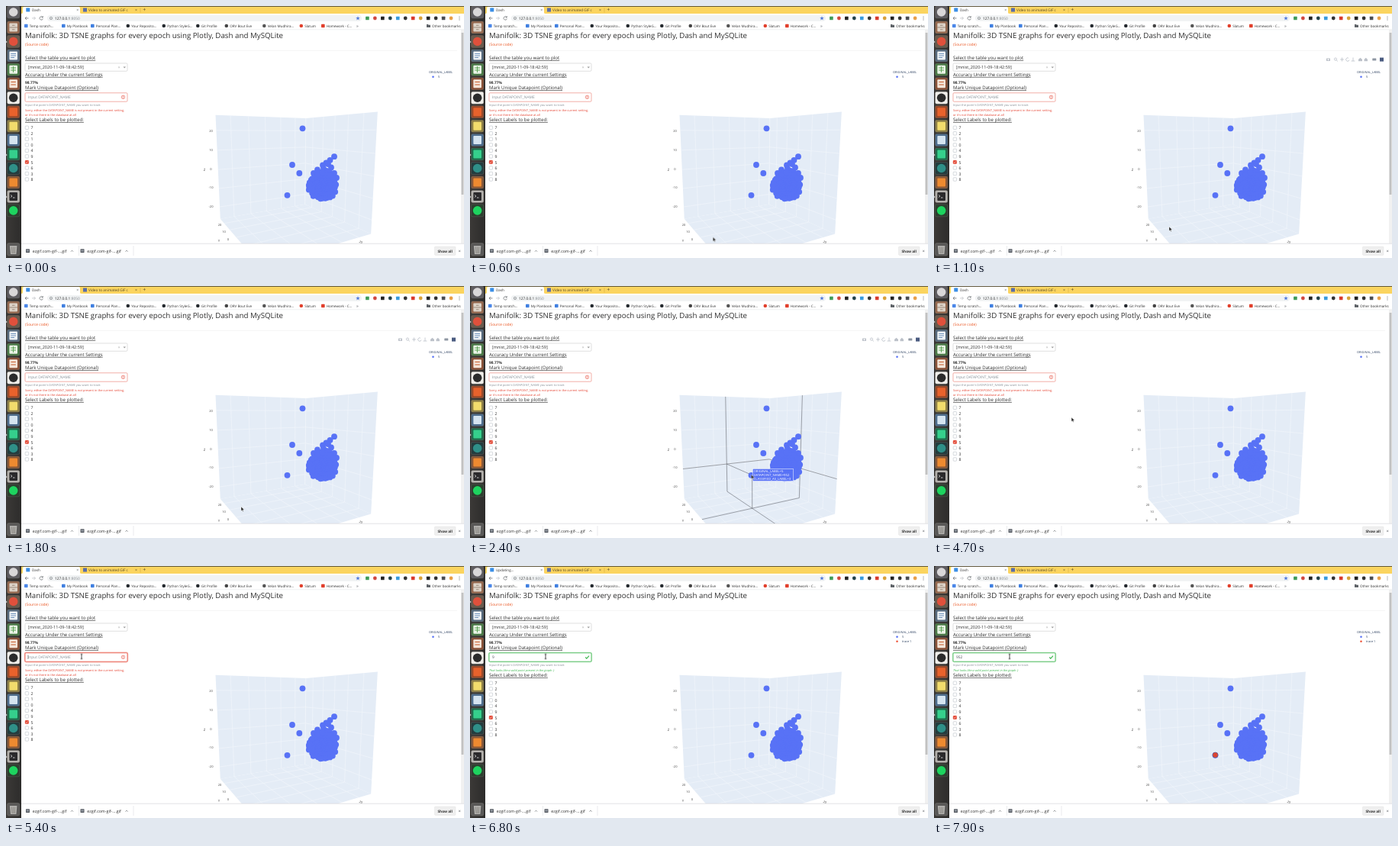
These frames come from a looping animation (600 by 330 pixels, 8 s). An HTML page:

```html
<!DOCTYPE html>
<html lang="en">
<head>
<meta charset="utf-8">
<title>Manifolk</title>
<style>
html, body { margin: 0; width: 100%; height: 100%; overflow: hidden; background: #fff; }
svg { display: block; width: 600px; height: 330px; }
text { font-family: "Open Sans", "Noto Sans", sans-serif; text-rendering: geometricPrecision; white-space: pre; }
.u { text-decoration: underline; }
.b { font-weight: 700; }
.i { font-style: italic; }
.m { text-anchor: middle; }

.a { animation: 8s step-end infinite; }
.bar { animation-name: bar; }
.hover { animation-name: hover; }
.before { animation-name: before; }
.after { animation-name: after; }
.focus { animation-name: focus; }
.busy { animation-name: busy; }
.idle { animation-name: idle; }
.n1 { animation-name: n1; }
.n2 { animation-name: n2; }
.n3 { animation-name: n3; }
.mark { animation-name: mark; }
.caret { animation-name: caret; }
.arrow { animation-name: arrow; }
.beam { animation-name: beam; }
.lift { animation-name: lift; }
.mouse { animation: mouse 8s linear infinite; }

@keyframes bar { 0% { opacity: 0 } 10% { opacity: 1 } 57.5%, 100% { opacity: 0 } }
@keyframes hover { 0% { opacity: 0 } 28.75% { opacity: 1 } 52%, 100% { opacity: 0 } }
@keyframes before { 0% { opacity: 1 } 83.75%, 100% { opacity: 0 } }
@keyframes after { 0% { opacity: 0 } 83.75%, 100% { opacity: 1 } }
@keyframes focus { 0% { opacity: 0 } 67% { opacity: 1 } 83.75%, 100% { opacity: 0 } }
@keyframes busy { 0% { opacity: 0 } 83.75% { opacity: 1 } 95%, 100% { opacity: 0 } }
@keyframes idle { 0% { opacity: 1 } 83.75% { opacity: 0 } 95%, 100% { opacity: 1 } }
@keyframes n1 { 0% { opacity: 0 } 83.75% { opacity: 1 } 88.75%, 100% { opacity: 0 } }
@keyframes n2 { 0% { opacity: 0 } 88.75% { opacity: 1 } 92.5%, 100% { opacity: 0 } }
@keyframes n3 { 0% { opacity: 0 } 92.5%, 100% { opacity: 1 } }
@keyframes mark { 0% { opacity: 0 } 95%, 100% { opacity: 1 } }
@keyframes caret { 0% { opacity: 0 } 67% { opacity: 1 } 73.5% { opacity: 0 } 79.5% { opacity: 1 } 83.75%, 100% { opacity: 0 } }
@keyframes arrow { 0% { opacity: 0 } 1.5% { opacity: 1 } 63.5%, 100% { opacity: 0 } }
@keyframes beam { 0% { opacity: 0 } 63.5%, 100% { opacity: 1 } }
@keyframes lift { 0% { transform: none } 83.75%, 100% { transform: translateY(-6px) } }
@keyframes mouse {
  0%, 1.5% { transform: translate(336px, 326px) }
  11%, 23% { transform: translate(308px, 289px) }
  28.5%, 51% { transform: translate(368.5px, 247px) }
  60% { transform: translate(150px, 160px) }
  65%, 100% { transform: translate(99px, 118.5px) }
}
</style>
</head>
<body>
<svg id="stage" viewBox="0 0 600 330" xmlns="http://www.w3.org/2000/svg">
  <defs>
    <clipPath id="page"><rect x="20" y="31" width="576" height="280"/></clipPath>
    <linearGradient id="dockFill" x1="0" x2="1" y1="0" y2="0">
      <stop offset="0" stop-color="#3b3937"/><stop offset="1" stop-color="#2d2c2b"/>
    </linearGradient>
    <linearGradient id="fade" x1="0" x2="1" y1="0" y2="0">
      <stop offset="0" stop-color="#fbd45f" stop-opacity="0"/><stop offset="1" stop-color="#fbd45f"/>
    </linearGradient>
  </defs>
  <rect width="600" height="330" fill="#fff"/>
  <g id="plot" clip-path="url(#page)"></g>
  <g id="form"></g>
  <g id="chrome"></g>
  <g id="dock"></g>
  <g class="mouse">
    <path class="a arrow" d="M0 0V5.6L1.3 4.4 2.2 6.3 3.1 5.9 2.3 4.1H4Z" fill="#222" stroke="#fff" stroke-width=".4"/>
    <path class="a beam" d="M-1.3-3H1.3M-1.3 3H1.3M0-3V3" fill="none" stroke="#222" stroke-width=".8"/>
  </g>
</svg>
<script>
const NS = 'http://www.w3.org/2000/svg';
let layer;
const use = id => layer = document.getElementById(id);
function add(tag, attrs, parent = layer) {
  const el = document.createElementNS(NS, tag);
  for (const k in attrs) el.setAttribute(k, attrs[k]);
  return parent.appendChild(el);
}
const rect = (x, y, width, height, fill, more) => add('rect', { x, y, width, height, fill, ...more });
const dot = (cx, cy, r, fill, more) => add('circle', { cx, cy, r, fill, ...more });
const line = (d, stroke, w = .7, more) =>
  add('path', { d, stroke, fill: 'none', 'stroke-width': w, ...more });
const text = (x, y, size, str, fill = '#2e2e2e', cls = '', more) => {
  add('text', { x, y, 'font-size': size, fill, class: cls, ...more }).textContent = str;
};
// Runs draw() inside a group that is shown by a keyframe class
function group(cls, draw) {
  const outer = layer;
  layer = add('g', { class: 'a ' + cls });
  draw();
  layer = outer;
}

const BLUE = '#5872f6', RED = '#e4402f', GREEN = '#38b44a', ORANGE = '#e95420', INK = '#2e2e2e';

// 3D box seen in perspective: a runs along the left wall, b along the right wall
const tilt = 9 * Math.PI / 180, sn = Math.sin(tilt), cs = Math.cos(tilt);
function project([a, b, z]) {
  const p = -.683 + .866 * a + .5 * b, q = .183 + .5 * a - .866 * b;
  const k = 322 / (2.165 + q * cs - z * sn);
  return (371.5 + p * k).toFixed(2) + ' ' + (217 - (q * sn + z * cs) * k).toFixed(2);
}
const path = pts => 'M' + pts.map(project).join('L');

function drawPlot() {
  use('plot');
  const walls = [
    [[0, 0, .5], [1, 0, .5], [1, 0, -.5], [0, 0, -.5]],
    [[1, 0, .5], [1, 1, .5], [1, 1, -.5], [1, 0, -.5]],
    [[0, 0, -.5], [1, 0, -.5], [1, 1, -.5], [0, 1, -.5]]
  ];
  walls.forEach(w => add('path', { d: path(w) + 'Z', fill: '#e4ecf6' }));

  let grid = '';
  for (let i = -2; i <= 2; i++) {
    const s = .5 + i * .18, z = i * .1845 - .008;
    grid += path([[0, 0, z], [1, 0, z], [1, 1, z]]);
    grid += path([[s, 0, .5], [s, 0, -.5], [s, 1, -.5]]);
    grid += path([[1, s, .5], [1, s, -.5], [0, s, -.5]]);
  }
  line(grid + path([[1, 0, .5], [1, 0, -.5]]), '#f1f5fb', .7);

  ['20', '10', '0', '-10', '-20'].forEach((t, i) =>
    text(268.5, 165 + i * 24.8, 4, t, '#444', 'm'));
  text(260, 216.3, 4.4, 'Z', '#444', 'm');
  ['20', '10', '0'].forEach((t, i) => text(280 + i * 5.5, 287.5 + i * 9.5, 4, t, '#444', 'm'));
  text(279, 309, 4.4, 'Y', '#444', 'm');
  text(465, 310.5, 4, '20', '#444', 'm', { transform: 'rotate(25 465 309)' });

  group('hover', () => {
    const a = .46, b = .545, z = -.197;
    const d = [
      [[0, 0, z], [1, 0, z], [1, 1, z]],
      [[a, 0, .5], [a, 0, -.5], [a, 1, -.5]],
      [[1, b, .5], [1, b, -.5], [0, b, -.5]],
      [[a, 0, z], [a, b, z], [1, b, z]],
      [[a, b, z], [a, b, -.5]]
    ].map(path).join('');
    line(d, '#5a5d63', .55);
  });

  const loose = [[388.5, 160.3], [375, 208], [384.3, 219], [368.5, 247.8], [430, 197.2], [424.5, 201.8],
    [419.5, 205.5], [415, 208.5], [416, 213], [422, 207], [408, 214.5], [426, 211.5], [403, 219],
    [412, 218], [420, 216], [430, 219], [433, 225], [424, 218]];
  loose.forEach(([x, y]) => dot(x, y, 3.9, BLUE));
  for (let i = 0; i < 130; i++) {
    const r = Math.sqrt(i / 130), t = i * 2.4, jog = Math.sin(i * 7.3);
    dot(414.8 + (18.8 * r + jog) * Math.cos(t), 235.8 + (17.6 * r + jog) * Math.sin(t), 3.7, BLUE);
  }
  group('mark', () => {
    dot(368.5, 247.5, 3.5, '#e8432f', { stroke: '#59618f', 'stroke-width': .7 });
    line('M366.5 245.5L370.5 249.5M370.5 245.5L366.5 249.5', '#a8483f', .5);
  });

  group('hover', () => {
    rect(370.3, 239.3, 53.4, 16.2, BLUE, { stroke: '#fff', 'stroke-width': .5 });
    ['ORIGINAL_LABEL=5', 'DATAPOINT_NAME=952', 'CLASSIFIED_AS_LABEL=3'].forEach((t, i) =>
      text(371.5, 244 + i * 5.1, 4.3, t, '#fff'));
  });

  text(554, 88.4, 3.95, 'ORIGINAL_LABEL', '#2a3f5f');
  dot(559.5, 92.8, 1.3, BLUE);
  text(566, 94.3, 3.9, '5', '#2a3f5f');
  group('after', () => {
    dot(559.5, 98.8, 1.3, '#ef553b');
    text(566, 100.3, 3.9, 'trace 1', '#2a3f5f');
  });
  group('bar', drawModebar);
}

function drawModebar() {
  const g = '#bcc1c9';
  rect(514, 68.4, 5, 3.6, g, { rx: .6 });
  dot(516.5, 70.2, 1, '#fff');
  dot(526, 69.6, 1.6, 'none', { stroke: g, 'stroke-width': .8 });
  line('M527.2 70.8L528.8 72.4', g, .9);
  line('M532 70H537M534.5 67.5V72.5', g, .8);
  line('M543 68.2A2.2 2.2 0 1 0 544 70.6', g, .8);
  line('M546.6 72H551.4M549 67.5V72', g, .8);
  add('path', { d: 'M556 70L558.5 67.8 561 70V72.2H556Z', fill: g });
  add('path', { d: 'M563.5 70L565.8 67.8 568 70V72.2H563.5Z', fill: g });
  rect(574.3, 68.6, 5, 3, '#8f97a3', { rx: .5 });
  rect(584, 67.6, 5, 5, '#4a5b80');
}

function drawForm() {
  use('form');
  text(25, 42.2, 9.75, 'Manifolk: 3D TSNE graphs for every epoch using Plotly, Dash and MySQLite');
  text(25, 51.8, 4.9, '(Source code)', ORANGE);
  line('M25 58.5H591', '#ededed', .5);
  text(25, 70.4, 6.17, 'Select the table you want to plot', INK, 'u');
  rect(25, 75, 134, 10.3, '#fff', { rx: 1.2, stroke: '#ccc', 'stroke-width': .6 });
  text(29, 82, 5.5, '[mnist_2020-11-09-18:42:59]');
  text(148.2, 81.9, 4.8, '×', '#999', 'm');
  add('path', { d: 'M153.5 79.5H157L155.25 81.4Z', fill: '#999' });
  text(25, 91.9, 6.08, 'Accuracy Under the current Settings', INK, 'u');
  text(25, 101.5, 4.9, '98.77%', INK, 'b');
  text(25, 109.2, 6.08, 'Mark Unique Datapoint (Optional)', INK, 'u');

  const field = (stroke, w) =>
    rect(25, 113.8, 134, 11.4, '#fff', { rx: 1.2, stroke, 'stroke-width': w });
  group('before', () => field('#ee8d83', .7));
  group('focus', () => {
    field('#f6b9b2', 2.4);
    field(RED, .7);
  });
  group('before', () => {
    text(29, 121.2, 4.9, 'Input DATAPOINT_NAME', '#868e96');
    dot(153.5, 119.3, 2.2, 'none', { stroke: RED, 'stroke-width': .6 });
    line('M153.5 118V119.7M153.5 120.2V120.8', RED, .6);
    text(25, 138, 3.92, 'Sorry, either the DATAPOINT_NAME is not present in the current setting,', RED);
    text(25, 143.9, 3.92, "or it's not there in the database at all", RED);
  });
  group('after', () => {
    field('#c3e9c9', 2.2);
    field(GREEN, .8);
    line('M151.2 119.5L152.8 121.1 156 117.7', GREEN, 1.1);
    text(25, 137.6, 3.9, 'That looks like a valid point present in the graph :)', GREEN, 'i');
  });
  group('caret', () => line('M28.9 116.5V122', INK, .5));
  ['9', '95', '952'].forEach((t, i) => group('n' + (i + 1), () => text(29, 121.2, 4.9, t, '#495057')));
  text(25, 130.8, 3.97, "Input the point's DATAPOINT_NAME you want to track", '#868e96');

  group('lift', () => {
    text(25, 151.3, 6.15, 'Select Labels to be plotted:', INK, 'u');
    [...'7210495638'].forEach((t, i) => {
      const y = 159.4 + i * 7.52, on = t === '5';
      rect(25.2, y - 2.3, 4.4, 4.4, on ? '#e03c28' : '#fff',
        { rx: .8, stroke: on ? '#e03c28' : '#adb5bd', 'stroke-width': .5 });
      if (on) line(`M26.2 ${y}L27.1 ${y + .9} 28.6 ${y - 1}`, '#fff', .7);
      text(32.6, y + 2, 5.2, t);
    });
  });
}

function drawChrome() {
  use('chrome');
  const grey = '#5f6368';
  // Tabs
  rect(20, 0, 580, 10, '#fbd45f');
  add('path', { d: 'M20 10Q22 10 22 8.5V3Q22 1 24 1H95Q97 1 97 3V8.5Q97 10 99 10Z', fill: '#fff' });
  rect(20, 0, 580, .8, '#3c3b37');
  rect(26.3, 2.6, 5, 5, '#3a8ee6', { rx: .6 });
  group('idle', () => text(34, 6.8, 4.6, 'Dash'));
  group('busy', () => text(34, 6.8, 4.6, 'Updating...'));
  text(93.8, 6.9, 5.2, '×', grey, 'm');
  rect(101, 2.6, 5, 5, '#5a6ea8');
  text(108, 6.8, 4.7, 'Video to animated GIF c', '#4c4326');
  rect(157, 1.5, 10, 8, 'url(#fade)');
  text(170.5, 6.9, 5.2, '×', '#5c512c', 'm');
  line('M176 2.5V8.5', '#c9a63f', .5);
  text(181.3, 7.4, 7, '+', '#5c512c', 'm');

  // Address row
  rect(20, 10, 580, 21, '#fff');
  line('M29.5 16H25M27 14L25 16 27 18', grey);
  line('M34 16H38.5M36.5 14L38.5 16 36.5 18', '#b9bcc0');
  line('M48 14.6A2.2 2.2 0 1 0 48.4 16.6M48.3 13.2V15H46.5', grey);
  rect(54, 11.9, 412, 8.2, '#f1f3f4', { rx: 4.1 });
  dot(59, 16, 1.7, 'none', { stroke: grey, 'stroke-width': .5 });
  line('M59 15.6V17', grey, .5);
  text(64, 17.7, 4.8, '127.0.0.1', '#222');
  text(84.6, 17.7, 4.8, ':8050', '#80868b');
  add('path', { d: 'M461 13.2L461.7 15.2H463.8L462.1 16.4 462.8 18.4 461 17.2 459.2 18.4 459.9 16.4 458.2 15.2H460.3Z', fill: '#4a73d8' });
  ['#3f9b57', '#d0483f', '#222', '#24424a', '#3a9bdc', '#333', '#d93a2b', '#d8a13a', '#222', '#333', '#4a4d52', '#e8a04a']
    .forEach((c, i) => {
      const x = 473.4 + i * 9.97;
      if (i % 2) dot(x, 16, 2.4, c);
      else rect(x - 2.3, 13.7, 4.6, 4.6, c, { rx: .6 });
    });
  [14, 16, 18].forEach(y => dot(594, y, .6, grey));

  // Bookmarks
  const marks = [
    [24, '#4a86e8', 'Temp scratch...'], [73, '#3f7fe0', 'My Planbook'], [111, '#3f7fe0', 'Personal Plan...'],
    [157.5, '#24292e', 'Your Reposito...'], [204.5, '#24292e', 'Python StyleG...'], [249, '#24292e', 'Git Profile'],
    [286.5, '#444', 'ORV Bout Eve'], [336, '#555', 'Velan Mudhira...'], [384.5, '#e13f2b', 'Slatum'],
    [413, '#e13f2b', 'Homework - C...']
  ];
  marks.forEach(([x, c, t], i) => {
    if (i > 2 && i < 9) dot(x + 2.3, 26, 2.3, c);
    else rect(x, 23.7, 4.6, 4.6, c, { rx: .7 });
    text(x + 6.7, 27.7, 4.55, t);
  });
  text(459, 27.9, 5.5, '»', grey);
  add('path', { d: 'M551 24H553L553.6 24.7H556V28H551Z', fill: grey });
  text(558, 27.7, 4.6, 'Other bookmarks');
  line('M20 30.8H600', '#dadce0', .4);

  // Scrollbar
  rect(596, 31, 4, 280, '#f1f1f1');
  rect(596.6, 35, 2.8, 212, '#c1c1c1');

  // Downloads
  rect(20, 311, 580, 19, '#fff');
  line('M20 311.2H600', '#cfd1d4', .6);
  [26, 97.5].forEach(x => {
    rect(x, 318.3, 5, 4.6, '#50555c', { rx: .4 });
    rect(x + .8, 319.3, 3.4, 2.4, '#8f969e');
    text(x + 8.8, 322.8, 5.3, 'ezgif.com-gif-....gif');
    line(`M${x + 59} 321.6L${x + 60.5} 320.1 ${x + 62} 321.6`, grey);
    line(`M${x + 69.5} 314V327`, '#d5d7da', .5);
  });
  rect(561.5, 315, 27.5, 11.4, '#efefef', { rx: 1.2, stroke: '#e2e2e2', 'stroke-width': .5 });
  text(575.2, 322.5, 4.7, 'Show all', INK, 'm b');
  text(594.3, 322.8, 6, '×', grey, 'm');
}

function drawDock() {
  use('dock');
  rect(0, 0, 20, 330, 'url(#dockFill)');
  // [tile, symbol colour, round?]
  const tiles = [
    ['#5e5c60', '#d9d7d8', 1], ['#94684f', '#ddd3c8', 0], ['#6a5a4c', '#e0503c', 1], ['#56697c', '#eef2f5', 0],
    ['#4b7a48', '#eaf3e6', 0], ['#8a5138', '#f4e6da', 0], ['#f0eeea', '#2b2b2b', 1], ['#9a4a2a', '#e8622c', 0],
    ['#8f8047', '#f2dc6c', 0], ['#4d6c8c', '#d5e4f0', 0], ['#1f6b4c', '#35d08c', 0], ['#243c3e', '#2f8f88', 1],
    ['#8a5837', '#ee8a30', 0], ['#b4b1ad', '#2b2a2c', 0], ['#2c3f2f', '#1ed45f', 1]
  ];
  tiles.forEach(([bg, fg, round], i) => {
    const y = i ? 28 + (i - 1) * 18.45 : 8;
    rect(1.6, y - 8, 16.2, 16, bg, { rx: 2, stroke: '#85807b', 'stroke-width': .4, 'stroke-opacity': .7 });
    if (round) dot(9.7, y, 5.8, fg);
    else rect(4.4, y - 5.5, 10.6, 11, fg, { rx: 1 });
  });
  // Drawers, lines on the documents, prompt in the terminal
  line('M4.4 28H15M8 25.3H11.5M8 30.8H11.5', '#8a7767', .8);
  line('M6.3 62.5H13M6.3 65H13M6.3 67.5H11', '#5f86b5', .9);
  line('M6.3 81H13M6.3 84H13M9.6 79V87', '#4c9a45', .9);
  line('M6.5 103H12.8M6.5 99.5H12.8', '#c85a2a', 1.2);
  line('M6.2 247.5L8 249 6.2 250.5M9 251H11.5', '#e8e8e8', .8);
  [47, 195, 250].forEach(y => add('path', { d: `M.2 ${y - 1.5}L1.6 ${y} .2 ${y + 1.5}Z`, fill: '#ddd' }));
  // Bin
  rect(1.6, 310.5, 16.2, 16.5, '#5a5958', { rx: 2, stroke: '#85807b', 'stroke-width': .4 });
  add('path', { d: 'M5 314H14.4L13.4 325H6Z', fill: '#b4b3b0' });
  line('M7.5 315.5L8 324M9.7 315.5V324M11.9 315.5L11.4 324', '#77746f', .7);
}

drawPlot();
drawForm();
drawChrome();
drawDock();
</script>
</body>
</html>
```
